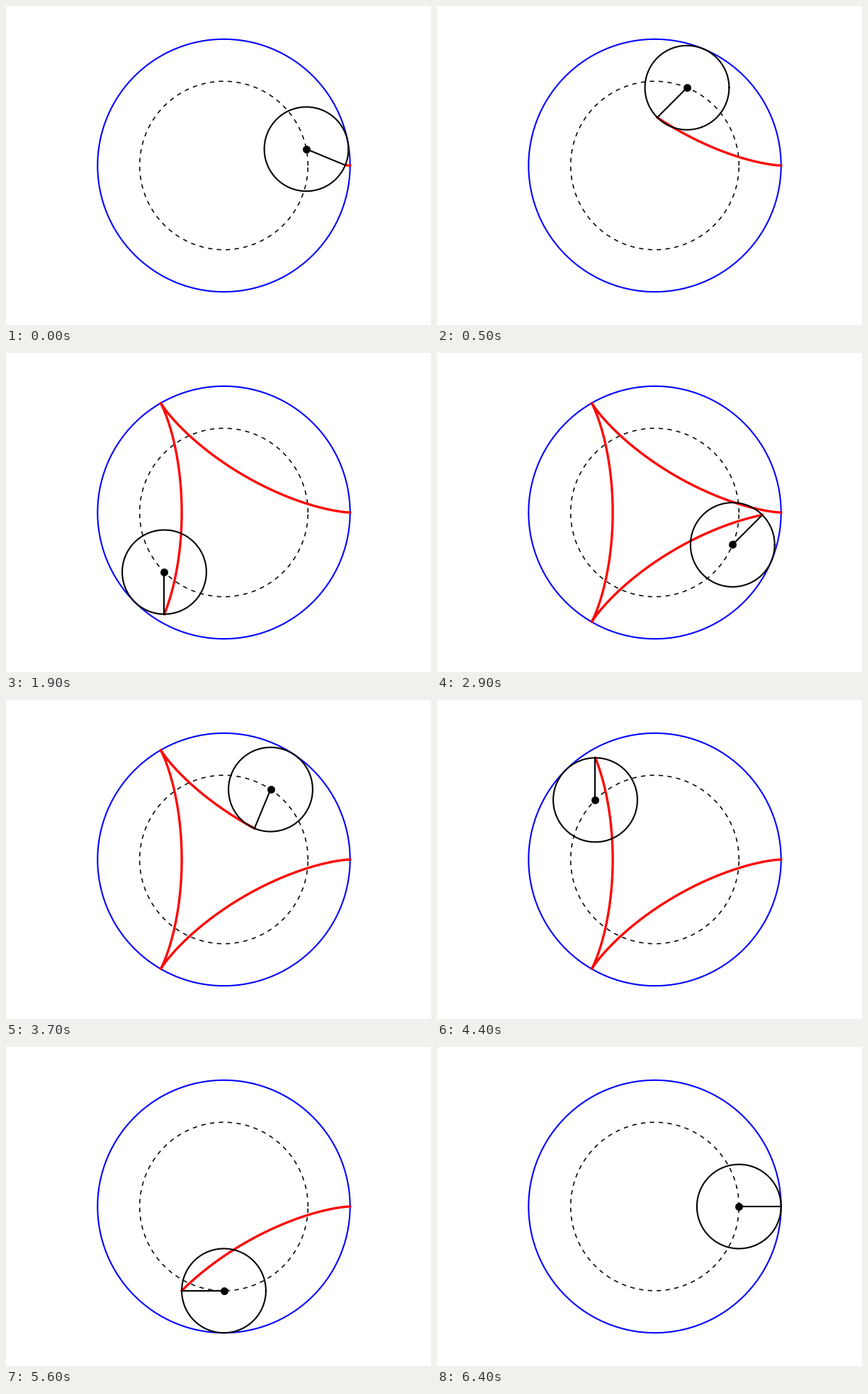
Write a matplotlib script that moves like this. It is 600 by 450 pixels and loops after 6500 ms.

```python
import numpy as np
import matplotlib.pyplot as plt
from matplotlib.animation import FuncAnimation

R, r = 3.0, 1.0      # fixed and rolling radii
TURN = 32            # steps per revolution
SUB = 20             # curve samples per step
VIEW = 1.01 * R


def circle(radius, cx=0.0, cy=0.0):
    a = np.linspace(0, 2 * np.pi, 201)
    return cx + radius * np.cos(a), cy + radius * np.sin(a)


def centre(t):
    return (R - r) * np.cos(t), (R - r) * np.sin(t)


def pen(t):
    cx, cy = centre(t)
    spin = (R - r) / r * t
    return cx + r * np.cos(spin), cy - r * np.sin(spin)


fig = plt.figure(figsize=(8, 6), dpi=75, facecolor="white")
ax = fig.add_axes([0.125, 0.1, 0.775, 0.8])
ax.axis("off")
ax.set_xlim(-VIEW * 465 / 360, VIEW * 465 / 360)
ax.set_ylim(-VIEW, VIEW)

ax.plot(*circle(R), color="blue", lw=2)
ax.plot(*circle(R - r), color="black", lw=1.5, ls=(0, (4, 4)))
trace, = ax.plot([], [], color="red", lw=3.2)
wheel, = ax.plot([], [], color="black", lw=2)
spoke, = ax.plot([], [], color="black", lw=2)
hub, = ax.plot([], [], "o", color="black", ms=10, mew=0.5)

curve_x, curve_y = pen(np.linspace(0, 2 * np.pi, TURN * SUB + 1))


def update(i):
    # First turn draws the curve, second turn wipes it from its start.
    if i < TURN:
        step = i + 1
        part = slice(0, step * SUB + 1)
    else:
        step = i - TURN
        part = slice(step * SUB, None)
    t = 2 * np.pi * step / TURN
    cx, cy = centre(t)
    px, py = pen(t)
    trace.set_data(curve_x[part], curve_y[part])
    wheel.set_data(*circle(r, cx, cy))
    spoke.set_data([cx, px], [cy, py])
    hub.set_data([cx], [cy])
    return trace, wheel, spoke, hub


anim = FuncAnimation(fig, update, frames=2 * TURN + 1, interval=100,
                     repeat=True, repeat_delay=0)
plt.show()
```
